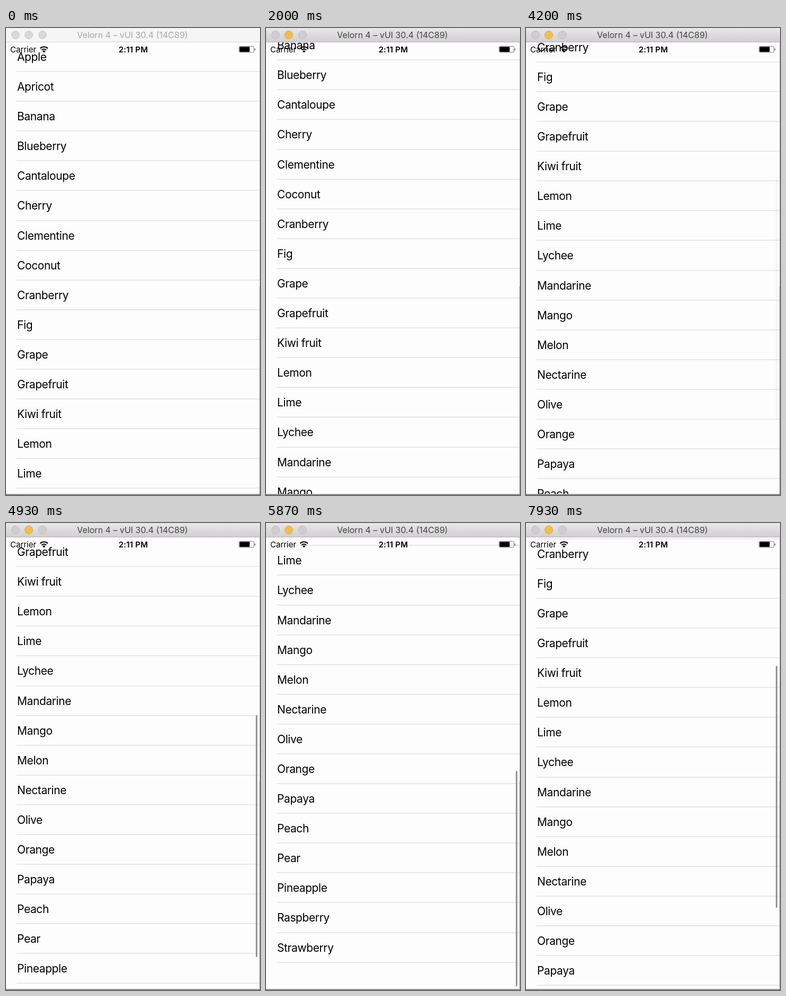
These frames come from a looping animation (480 by 880 pixels, 8 s). An HTML page:

```html
<!DOCTYPE html>
<html lang="en">
<head>
<meta charset="utf-8">
<title>Fruit list</title>
<style>
  html, body { margin: 0; width: 100%; height: 100%; overflow: hidden; }
  body { position: relative; background: #fefdfe; color: #000; font-family: Inter, "Open Sans", sans-serif; }
  body > * { position: absolute; }
  #view { left: 0; top: 27px; width: 479px; height: 851px; overflow: hidden; }
  #list { margin: 0 0 0 20px; padding: 0; list-style: none; }
  #list li {
    box-sizing: border-box; height: 56.1px; padding-left: 1px;
    border-bottom: 2px solid #e7e6e9;
    font-size: 21px; line-height: 55px; letter-spacing: -.4px;
  }
  #titlebar {
    left: 0; top: 0; width: 480px; height: 26px; border-bottom: 1px solid #d6d5d6;
    background: #f6f5f6; color: #a9a8a9;
    font-size: 16px; line-height: 26px; text-align: center; text-indent: -2px;
  }
  #titlebar i {
    position: absolute; box-sizing: border-box; top: 5px; width: 16px; height: 16px;
    border: 1px solid #cecdce; border-radius: 50%; background: #d9d8d9;
  }
  #titlebar.active { background: linear-gradient(#e9e7e9, #d1cfd1); border-color: #b3b1b3; color: #444; }
  #titlebar.active i { background: #cfcdcf; border-color: #bfbdbf; }
  #titlebar.active i:nth-of-type(2) { background: #f1be4b; border-color: #dca942; }
  #status { left: 0; top: 27px; }
  #bar { left: 472px; width: 3px; border-radius: 1.5px; background: #959496; }
  #bottom { left: 0; top: 878px; width: 480px; height: 2px; background: #949394; }
  #right { left: 479px; top: 27px; width: 1px; height: 853px; background: linear-gradient(#c4c3c4 460px, #929192 460px); }
</style>
</head>
<body>
<div id="view"><ul id="list"></ul></div>
<svg id="status" width="480" height="28" font-size="15">
  <text x="8" y="18.5">Carrier</text>
  <text x="240.5" y="18.5" text-anchor="middle" font-weight="600" letter-spacing=".2">2:11 PM</text>
  <g fill="none" stroke="#000" stroke-width="2">
    <path d="M64.500 11.500A10.500 10.500 0 0 1 79 11.500M67.300 14.500A6.500 6.500 0 0 1 76.200 14.500"/>
  </g>
  <path d="M71.750 19.500L69 16.500A4 4 0 0 1 74.500 16.500Z"/>
  <rect x="440.500" y="7.500" width="28" height="11.500" rx="2" fill="none" stroke="#777"/>
  <rect x="441.500" y="8.500" width="19" height="9.500" rx="1"/>
  <path d="M470 11v5q2-2.500 0-5"/>
</svg>
<div id="bar"></div>
<div id="right"></div>
<div id="bottom"></div>
<div id="titlebar"><i style="left:10px"></i><i style="left:35px"></i><i style="left:61px"></i>Velorn 4 – vUI 30.4 (14C89)</div>
<script>
const fruits = `Apple,Apricot,Banana,Blueberry,Cantaloupe,Cherry,Clementine,Coconut,Cranberry,Fig,Grape,
Grapefruit,Kiwi fruit,Lemon,Lime,Lychee,Mandarine,Mango,Melon,Nectarine,Olive,Orange,Papaya,Peach,Pear,
Pineapple,Raspberry,Strawberry`.split(/,\s*/);

const LOOP = 8000, FPS = 15, MAX_SCROLL = 719;
const $ = id => document.getElementById(id);
const list = $('list'), bar = $('bar'), titlebar = $('titlebar');
list.innerHTML = fruits.map(name => `<li>${name}</li>`).join('');

const out = power => u => 1 - (1 - u) ** power;
const smooth = u => u * u * (3 - 2 * u);
const linear = u => u;

// Each segment: start time, end time, value reached, easing
const scrolls = [
  [1067, 1667, 134, out(1.5)],
  [2267, 3133, 445, out(1.44)],
  [3400, 3800, 467, smooth],
  [4533, 5133, 665, out(1.29)],
  [5200, 5800, 778, out(1.4)],
  [5800, 6067, MAX_SCROLL, smooth],
  [6200, 7067, 455, out(1.44)],
  [7467, 7667, 445, smooth]
];
const fades = [
  [1067, 1133, 1, linear],
  [1700, 2000, 0, linear],
  [2267, 2333, 1, linear],
  [3933, 4200, .08, linear],
  [4533, 4600, 1, linear]
];

function valueAt(segments, t) {
  let value = 0;
  for (const [start, end, target, ease] of segments) {
    if (t <= start) break;
    value += (target - value) * ease(Math.min(1, (t - start) / (end - start)));
  }
  return value;
}

function draw(now) {
  const tick = Math.floor(now % LOOP * FPS / 1000 + .1);
  const t = tick * 1000 / FPS;
  const scroll = valueAt(scrolls, t);
  const over = Math.max(0, scroll - MAX_SCROLL);

  list.style.transform = `translateY(${-Math.round(scroll)}px)`;
  bar.style.top = 30 + .538 * (scroll - over) + over + 'px';
  bar.style.height = 456 - over + 'px';
  bar.style.opacity = valueAt(fades, t);
  titlebar.className = t > 1100 ? 'active' : '';
  requestAnimationFrame(draw);
}
draw(0);
</script>
</body>
</html>
```
